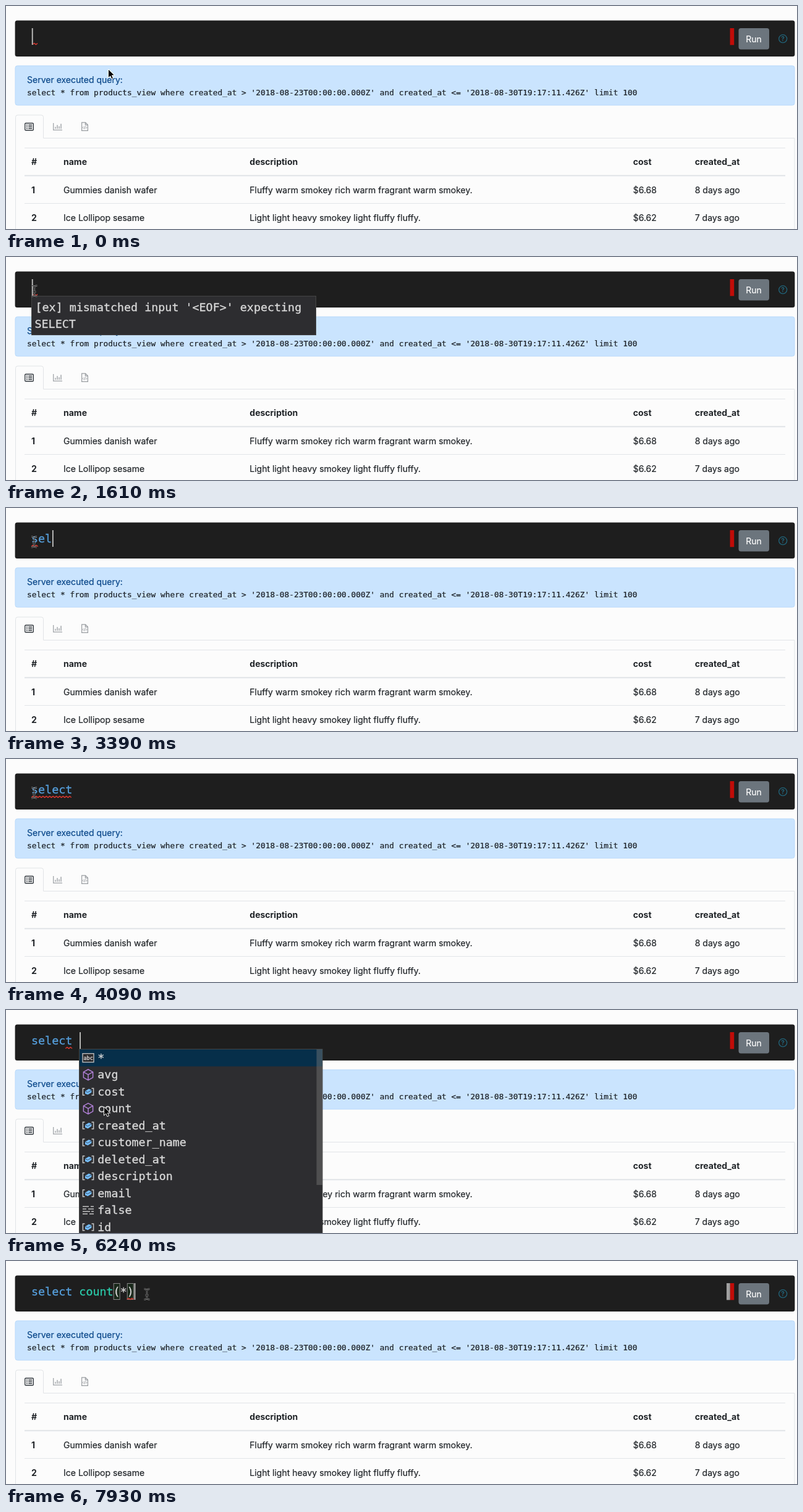
Recreate the animation shown at these times as an HTML page. Size 1280 by 362 pixels, loop 8 s.

```html
<!DOCTYPE html>
<html lang="en">
<head>
<meta charset="utf-8">
<title>Query editor</title>
<style>
  html, body { margin: 0; width: 100%; height: 100%; overflow: hidden; background: #fcfcfc; }
  svg { display: block; width: 1280px; height: 362px; }
  text { white-space: pre; fill: currentColor; stroke: currentColor; stroke-width: .2px; }
  .ui { font: 14.03px Inter, Roboto, sans-serif; color: #212529; }
  .bold { font-weight: 700; stroke: none; }
  .sql { font: 12.82px "DejaVu Sans Mono", monospace; color: #1b2025; }
  .code { font: 18.35px "DejaVu Sans Mono", monospace; color: #d8d8d8; stroke-width: .35px; }
</style>
</head>
<body>
<svg id="stage" viewBox="0 0 1280 362" xmlns="http://www.w3.org/2000/svg"></svg>
<script>
const LOOP = 8000, TICK = 90;
const X0 = 41, ADVANCE = 11.05, ROW = 27.47;
const column = n => X0 + ADVANCE * n;

const rect = (x, y, w, h, fill, extra = '') =>
  `<rect x="${x}" y="${y}" width="${w}" height="${h}" fill="${fill}" ${extra}/>`;
const path = (d, stroke, extra = '') => `<path d="${d}" fill="none" stroke="${stroke}" ${extra}/>`;
const escape = s => s.replace(/&/g, '&amp;').replace(/</g, '&lt;').replace(/>/g, '&gt;');
const text = (x, y, s, cls, extra = '') => `<text x="${x}" y="${y}" class="${cls}" ${extra}>${escape(s)}</text>`;
const group = (id, body) => `<g id="${id}">${body}</g>`;

function tabIcons() {
  const list = rect(30.7, 190.2, 13.6, 11.6, 'none', 'rx="1.3" stroke="#343a40" stroke-width="1.4"') +
    [193.3, 196, 198.7].map(y => path(`M33 ${y}h1.8M36.2 ${y}h6`, '#343a40', 'stroke-width="1.4"')).join('');
  const chart = path('M76.7 190v11.4H91', '#a3a7ab', 'stroke-width="1.3"') +
    path('M80 199.3v-3M83 199.3v-6M86 199.3v-4M89 199.3v-8', '#a3a7ab', 'stroke-width="1.5"');
  const file = path('M122.6 189.2h6l3.8 3.8v9.4h-9.8zM128.4 189.4v3.8h3.8', '#999da1', 'stroke-width="1.2"') +
    path('M125.7 195.6l-1.6 1.7 1.6 1.7M129.3 195.6l1.6 1.7-1.6 1.7M128.1 195l-1.2 4.8', '#999da1');
  return list + chart + file;
}

function tableView() {
  const columns = [41, 93, 394.3, 1014.7, 1114.7];
  const rows = [
    ['#', 'name', 'description', 'cost', 'created_at'],
    ['1', 'Gummies danish wafer', 'Fluffy warm smokey rich warm fragrant warm smokey.', '$6.68', '8 days ago'],
    ['2', 'Ice Lollipop sesame', 'Light light heavy smokey light fluffy fluffy.', '$6.62', '7 days ago'],
  ];
  const baselines = [258, 304, 349];
  const cells = rows.map((row, r) => row.map((s, c) =>
    text(columns[c], baselines[r], s, r && c ? 'ui' : 'ui bold')).join('')).join('');
  return rect(30, 230, 1231, 1, '#e2e5e8') + rect(30, 274.5, 1231, 1.8, '#dee2e6') +
    rect(30, 320, 1231, 1, '#e2e5e8') + cells;
}

function page() {
  return rect(0, 0, 1280, 362, '#fcfcfc') +
    rect(14.6, 23.6, 1261.8, 58.4, '#1e1e1e', 'rx="3.5"') +
    rect(1171.6, 36, 6.6, 27.3, '#c00c08') +
    rect(1185.5, 36, 49.5, 34.5, '#6c757d', 'rx="3.7"') +
    text(1197.2, 58.6, 'Run', 'ui', 'style="color:#fff"') +
    '<circle cx="1257.2" cy="53.2" r="6.5" fill="none" stroke="#21647a" stroke-width="1.3"/>' +
    text(1254.3, 56.9, '?', 'ui bold', 'style="color:#21647a;font-size:10px"') +
    rect(15, 97, 1261, 64, '#cae4fe', 'rx="3.5" stroke="#b8d9fb"') +
    text(34, 125, 'Server executed query:', 'ui', 'style="color:#0a4789"') +
    text(34, 144.6, "select * from products_view where created_at > '2018-08-23T00:00:00.000Z' and created_at <= '2018-08-30T19:17:11.426Z' limit 100", 'sql') +
    path('M15.5 362V180.5q0-3.5 3.5-3.5h38q3.5 0 3.5 3.5V214.5H1276V362', '#e1e4e7') +
    tabIcons() + tableView();
}

const suggestions = [
  ['abc', '*'], ['cube', 'avg'], ['field', 'cost'], ['cube', 'count'], ['field', 'created_at'],
  ['field', 'customer_name'], ['field', 'deleted_at'], ['field', 'description'], ['field', 'email'],
  ['word', 'false'], ['field', 'id'],
];

// Icons are centred on the origin.
const icons = {
  abc: rect(-9, -7, 18, 14, '#2b2b2d', 'stroke="#c5c5c5" stroke-width="1.3"') +
    text(-7.5, 3.4, 'abc', 'code', 'style="font-size:8.5px"'),
  cube: path('M0-8.7L7.6-4.5V4.5L0 8.7-7.6 4.5V-4.5ZM-7.6-4.5L0-.3 7.6-4.5M0-.3V8.7', '#b180d7', 'stroke-width="1.5"'),
  field: path('M-5.5-5.5H-8.6V5.5H-5.5M5.5-5.5H8.6V5.5H5.5', '#c5c5c5', 'stroke-width="1.5"') +
    '<path d="M-5-1L1-4.6 5.4-2.8V1L-.6 4.8-5 3Z" fill="#75beff"/>' +
    path('M-4.4-.6L-.6 1 5-2.4', '#2d2d30', 'stroke-width=".8"'),
  word: path('M-9-6H1M4-6H9M-9-2H-3M0-2H9M-9 2H3M5 2H9M-9 6H-1M2 6H9', '#c5c5c5', 'stroke-width="1.5"'),
};

function popup() {
  const items = suggestions.map(([icon, label], i) => {
    const y = 77.7 + ROW * i;
    return `<g transform="translate(133 ${y})">${icons[icon]}</g>` + text(148.3, y + 6.3, label, 'code');
  }).join('');
  return rect(118.5, 63.5, 393.5, 310, '#2d2d30', 'stroke="#454545"') +
    rect(119, 64, 393, 27.5, '#062f4a') + items +
    rect(502.5, 64, 9.5, 220, '#797979', 'fill-opacity=".45"');
}

const tooltip = () => rect(41.5, 63.5, 460, 63, '#2d2d30', 'stroke="#454545"') +
  text(47.5, 88, "[ex] mismatched input '<EOF>' expecting", 'code') + text(46.5, 115, 'SELECT', 'code');

const bracketBox = id => `<rect id="${id}" y="36.5" width="10" height="26" fill="#06400a" fill-opacity=".25" stroke="#888"/>`;

const ibeam = 'M-4.5-8.5Q0-8.5 0-5.5Q0-8.5 4.5-8.5M0-5.5V5.5M-2.5 1.5H2.5M-4.5 8.5Q0 8.5 0 5.5Q0 8.5 4.5 8.5';
const stage = document.getElementById('stage');
stage.innerHTML = page() +
  group('brackets', bracketBox('open') + bracketBox('close') + rect(1166, 36, 5.6, 27.3, '#a0a0a0')) +
  text(X0, 56, '', 'code', 'id="keyword" style="color:#569fdc"') +
  text(column(7), 56, '', 'code', 'id="callee" style="color:#2bcbaa"') +
  text(column(12), 56, '', 'code', 'id="args"') +
  '<path id="squiggle" fill="none" stroke="#e0382f" stroke-width="1.3"/>' +
  rect(0, 36, 1.8, 27, '#c4c4c2', 'id="caret"') +
  group('tooltip', tooltip()) + group('popup', popup()) +
  group('beam', path(ibeam, '#b5b5b5', 'stroke-width="2.4" stroke-opacity=".7"') + path(ibeam, '#151515', 'stroke-width="1"')) +
  group('arrow', '<path d="M0 0V14.2L3.3 11.2 5.4 16 8 14.9 5.9 10.2H10.2Z" fill="#000" stroke="#fff" stroke-width="1"/>');

const part = Object.fromEntries([...stage.querySelectorAll('[id]')].map(e => [e.id, e]));
const show = (el, on) => el.setAttribute('visibility', on ? 'visible' : 'hidden');
const latest = (steps, t) => steps.reduce((found, s) => s[0] <= t ? s : found);

const mouseKeys = [
  [0, 165.5, 102.5], [90, 165.5, 102.5], [270, 142, 95], [450, 84, 76], [630, 39, 61], [810, 43, 60],
  [990, 43, 60], [1170, 46, 55], [1530, 46, 55], [1620, 45.5, 55], [4230, 45.5, 55], [4680, 86, 55],
  [4950, 86, 55], [5040, 110, 55], [5220, 134, 68], [5450, 186, 98], [5700, 174, 137],
  [5880, 158.5, 154], [6030, 158.5, 157], [6450, 158.5, 157], [6660, 165, 124], [6930, 203, 42],
  [7110, 214, 14], [7200, 218, 40], [7650, 221, 54], [7830, 221, 54], [7920, 228, 54],
];

// time, typed keyword, function, arguments, caret column
const typing = [
  [0, '', '', '', 0], [2950, 's', '', '', 1], [3040, 'se', '', '', 2], [3390, 'sel', '', '', 3],
  [3480, 'sele', '', '', 4], [3570, 'select', '', '', 6], [4270, 'select', '', '', 7],
  [6320, 'select', 'count', '', 12], [7310, 'select', 'count', '()', 13],
  [7490, 'select', 'count', '(*)', 14], [7670, 'select', 'count', '(*)', 15],
];
// time, first column, last column
const errors = [[0, 0, 1], [3740, 0, 6], [4450, 5, 6], [6500, 7, 12], [7310, 13, 14], [7490, 14, 15]];
// moments at which the caret turns on or off, starting with on
const blinks = [0, 180, 540, 1080, 1610, 2150, 2690, 4090, 4270, 5090, 5400, 5880, 6240, 6860, 7230];

function mouseAt(t) {
  const time = Math.floor((t + 1) / TICK) * TICK;
  const i = mouseKeys.findIndex(k => k[0] > time);
  if (i < 0) return mouseKeys[mouseKeys.length - 1].slice(1);
  const [a, b] = [mouseKeys[i - 1], mouseKeys[i]];
  const k = (time - a[0]) / (b[0] - a[0]);
  return [a[1] + (b[1] - a[1]) * k, a[2] + (b[2] - a[2]) * k];
}

function zigzag(from, to) {
  let d = `M${from} 62.6`, up = true;
  for (let x = from + 2.7; x <= to + 0.5; x += 2.7, up = !up) d += `L${x} ${up ? 60.4 : 62.6}`;
  return d;
}

function render(t) {
  const [, keyword, callee, args, caret] = latest(typing, t);
  part.keyword.textContent = keyword;
  part.callee.textContent = callee;
  part.args.textContent = args;
  part.caret.setAttribute('x', column(caret) + 0.8);
  show(part.caret, blinks.filter(b => b <= t).length % 2);

  const [, from, to] = latest(errors, t);
  part.squiggle.setAttribute('d', zigzag(column(from) + (caret ? 0 : 2), column(to)));

  show(part.brackets, args && caret !== 14);
  part.open.setAttribute('x', column(12) + 0.6);
  part.close.setAttribute('x', column(11 + args.length) + 0.6);

  const popupOpen = t >= 4540 && t < 6320;
  show(part.popup, popupOpen);
  show(part.tooltip, t >= 1530 && t < 2950);
  part.tooltip.setAttribute('opacity', t < 1610 ? 0.5 : 1);

  const [x, y] = mouseAt(t);
  const overEditor = y > 24 && y < 82 && !(popupOpen && x > 119 && y > 64);
  for (const id of ['beam', 'arrow']) part[id].setAttribute('transform', `translate(${x} ${y})`);
  show(part.beam, overEditor);
  show(part.arrow, !overEditor);
}

const start = performance.now();
function frame() {
  render((performance.now() - start) % LOOP);
  requestAnimationFrame(frame);
}
render(0);
requestAnimationFrame(frame);
</script>
</body>
</html>
```
